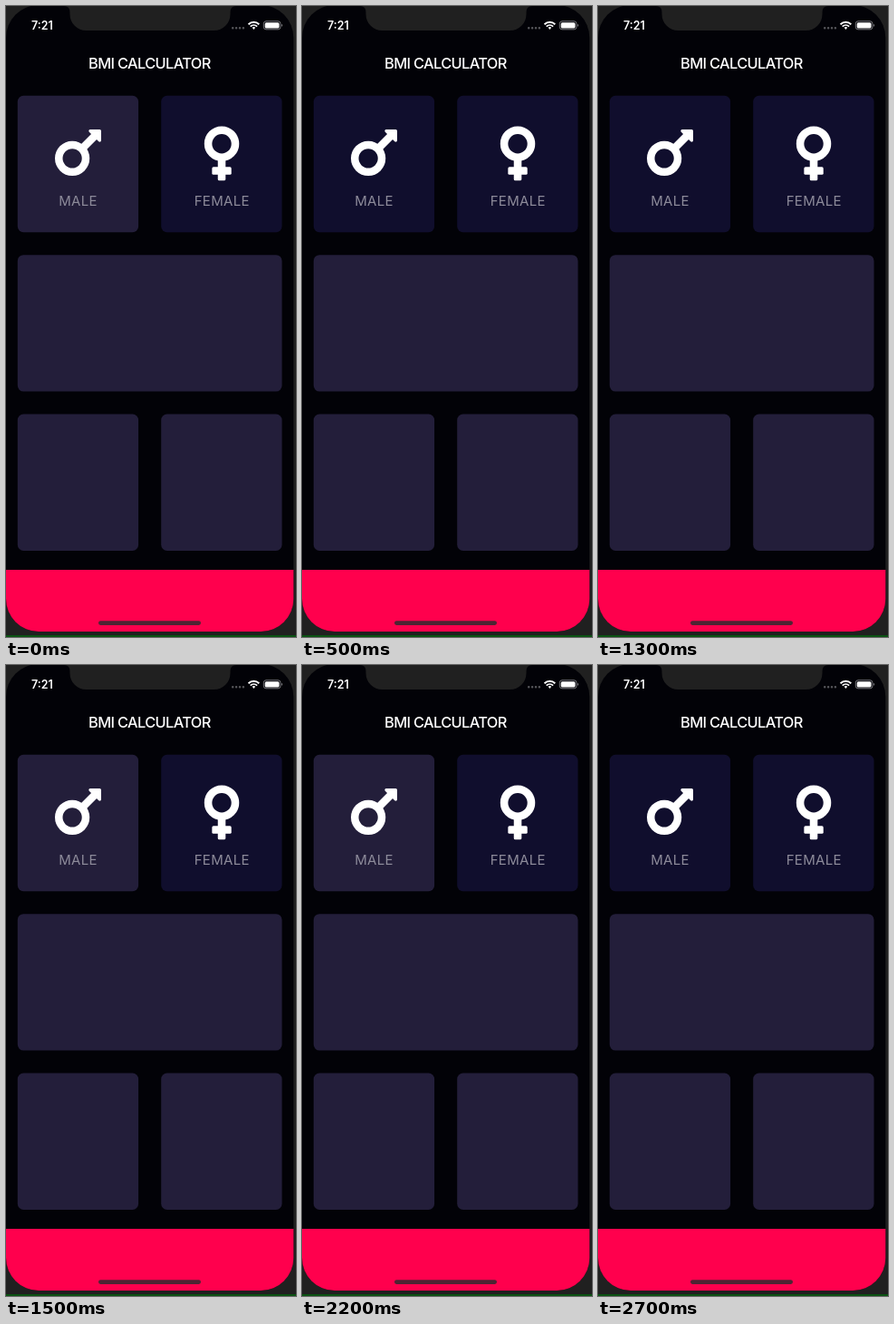
Write an HTML page that moves like this. It is 320 px wide and 695 px high and loops after 2800 ms.

```html
<!DOCTYPE html>
<html lang="en">
<head>
<meta charset="utf-8">
<title>BMI calculator</title>
<style>
  html, body { margin: 0; width: 100%; height: 100%; overflow: hidden; background: #202020; }
  svg { display: block; width: 100vw; height: 100vh; }
  text { font-family: Inter, Roboto, "Liberation Sans", sans-serif; fill: #fff; }
  .title { font-size: 16.4px; font-weight: 500; letter-spacing: -0.65px; text-anchor: middle; }
  .label { font-size: 15px; letter-spacing: 0.3px; text-anchor: middle; fill: #8d8b9a; }
  .clock { font-size: 12.5px; font-weight: 600; }
  .card { fill: #231e3a; }
  .card.off { fill: #100e2d; }
</style>
</head>
<body>
<svg viewBox="0 0 320 695" preserveAspectRatio="none">
  <defs>
    <clipPath id="screen"><rect y="-1" width="317.3" height="690" rx="36"/></clipPath>
  </defs>
  <rect width="320" height="695" fill="#202020"/>
  <rect y="693" width="320" height="2" fill="#0a5212"/>

  <g clip-path="url(#screen)">
    <rect y="-1" width="318" height="690" fill="#020207"/>
    <rect y="621" width="318" height="68" fill="#ff004d"/>
    <rect x="102" y="677.3" width="113" height="4.6" rx="2.3" fill="#4d2433"/>
  </g>
  <path fill="#202020" d="M64 0Q70.500 0 70.500 7V9a18 18 0 0 0 18 18H229.500a18 18 0 0 0 18-18V7Q247.500 0 254 0Z"/>

  <!-- status bar -->
  <text class="clock" x="28" y="26">7:21</text>
  <path d="M250.200 24.300H262" stroke="#56565b" stroke-width="2.500" stroke-linecap="round" stroke-dasharray="0 3.900"/>
  <g fill="none" stroke="#fff" stroke-width="1.900">
    <path d="M267.500 20.200a8.400 8.400 0 0 1 11.800 0M269.700 22.600a5.300 5.300 0 0 1 7.400 0"/>
    <path d="M271.600 23.800a2.700 2.700 0 0 1 3.600 0L273.400 26Z" fill="#fff" stroke="none"/>
  </g>
  <rect x="284.300" y="16.800" width="18.600" height="9" rx="2.600" fill="none" stroke="#85858a" stroke-width=".9"/>
  <rect x="285.700" y="18.200" width="15.800" height="6.200" rx="1.500" fill="#fff"/>
  <path d="M304 19.800a1.700 1.700 0 0 1 0 3Z" fill="#85858a"/>

  <text class="title" x="158.400" y="68.600">BMI CALCULATOR</text>

  <g id="cards"></g>

  <!-- male -->
  <g transform="translate(54 127.500) scale(.1328)" fill="none" stroke="#fff" stroke-width="64">
    <circle cx="144" cy="304" r="112"/>
    <path d="M236 212L330 118"/>
    <path fill="#fff" stroke="none" d="M372 64H293c-10.700 0-16 12.900-8.500 20.400L363.500 163.500c7.600 7.600 20.400 2.200 20.400-8.500V76c0-6.600-5.300-12-11.900-12Z"/>
  </g>
  <text class="label" x="79.500" y="220">MALE</text>

  <!-- female -->
  <g transform="translate(218.800 128.200) scale(.1335)" fill="#fff">
    <circle cx="144" cy="176" r="112" fill="none" stroke="#fff" stroke-width="64"/>
    <rect x="112" y="300" width="64" height="180" rx="12"/>
    <rect x="64" y="368" width="160" height="64" rx="12"/>
  </g>
  <text class="label" x="238.200" y="220">FEMALE</text>
</svg>
<script>
  const LOOP = 2800;
  const TAPS = [500, 1500, 2500]; // each tap toggles the male card
  const LEFT = 12.8, RIGHT = 171.2, HALF = 133.3, FULL = 291.7;

  const holder = document.getElementById("cards");

  function addCard(x, y, width, off) {
    const rect = document.createElementNS("http://www.w3.org/2000/svg", "rect");
    const attrs = { x, y, width, height: 150.4, rx: 6.5, class: off ? "card off" : "card" };
    for (const key in attrs) rect.setAttribute(key, attrs[key]);
    return holder.appendChild(rect);
  }

  const male = addCard(LEFT, 98.8, HALF);
  addCard(RIGHT, 98.8, HALF, true);
  addCard(LEFT, 274.2, FULL);
  addCard(LEFT, 449.5, HALF);
  addCard(RIGHT, 449.5, HALF);

  function draw(time) {
    const taps = TAPS.filter(tap => tap <= time).length;
    male.classList.toggle("off", taps % 2 === 1);
  }

  const start = performance.now();
  function tick() {
    draw((performance.now() - start) % LOOP);
    requestAnimationFrame(tick);
  }
  tick();
</script>
</body>
</html>
```
